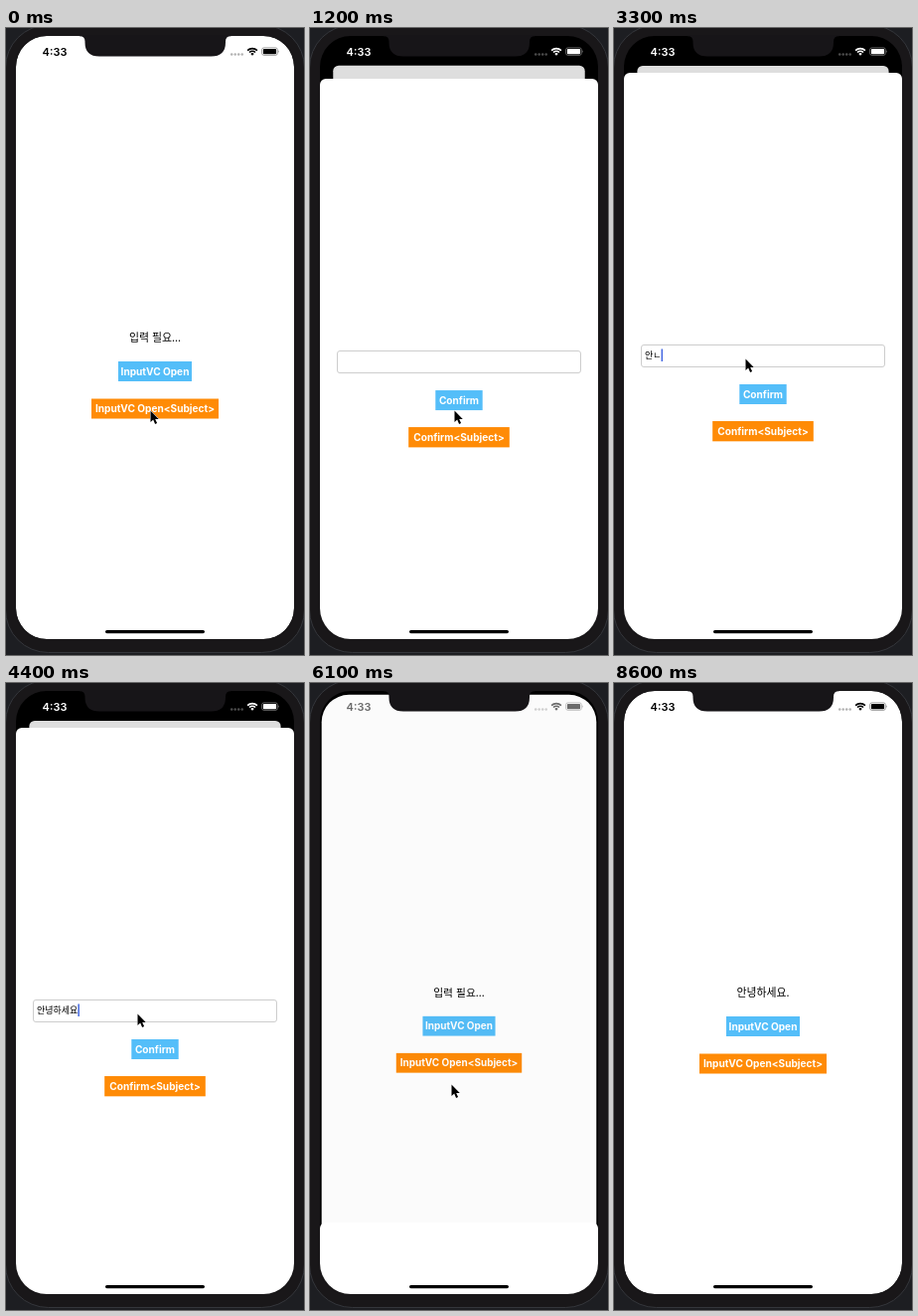
An HTML page for the animation above (8700 ms loop, 300 by 630 pixels).

```html
<!DOCTYPE html>
<html lang="ko">
<head>
<meta charset="utf-8">
<style>
  html, body { margin: 0; width: 100%; height: 100%; overflow: hidden; background: #1d1e22; }
  svg { display: block; width: 300px; height: 630px; }
  text { font-family: Inter, sans-serif; text-anchor: middle; }
  .title { font-size: 10.1px; font-weight: 700; fill: #fff; }
  .ko { font-family: "Noto Sans CJK KR", "Noto Sans CJK", sans-serif; }
  .blue { fill: #54bef9; }
  .orange { fill: #ff8b06; }
</style>
</head>
<body>
<svg viewBox="0 0 300 630">
  <defs>
    <clipPath id="screen"><rect x="10" y="8" width="280" height="606" rx="31"/></clipPath>
  </defs>
  <rect x="-.5" y="-3" width="301" height="630.5" rx="43" fill="#191719" stroke="#34363b"/>

  <g clip-path="url(#screen)">
    <rect x="10" y="8" width="280" height="606"/>
    <g id="home">
      <rect id="homeBack" x="10" y="8" width="280" height="606" fill="#fff"/>
      <text id="label" class="ko" x="150" y="315" font-size="10.9"></text>
      <rect class="blue" x="113" y="335" width="74" height="20"/>
      <text class="title" x="150" y="348.8">InputVC Open</text>
      <rect class="orange" x="86" y="372.5" width="128" height="20"/>
      <text id="openTitle" class="title" x="150" y="386.1">InputVC Open&lt;Subject&gt;</text>
      <rect id="dim" x="10" y="8" width="280" height="606"/>
    </g>

    <g id="status">
      <text x="49" y="27.5" font-size="11" font-weight="600">4:33</text>
      <g opacity=".3">
        <circle cx="227.2" cy="26.4" r="1.25"/><circle cx="230.7" cy="26.4" r="1.25"/>
        <circle cx="234.2" cy="26.4" r="1.25"/><circle cx="237.7" cy="26.4" r="1.25"/>
      </g>
      <g fill="none" stroke="currentColor" stroke-width="1.6">
        <path d="M243.1 22.6A7 7 0 0 1 252.9 22.6M245 24.5A4.3 4.3 0 0 1 251 24.5"/>
      </g>
      <path d="M248 27.7L246.3 25.9A2.4 2.4 0 0 1 249.7 25.9Z"/>
      <rect x="257.6" y="19.8" width="15.8" height="7.6" rx="2.2" fill="none" stroke="currentColor" stroke-width=".8" opacity=".45"/>
      <rect x="258.9" y="21" width="13.2" height="5.2" rx="1"/>
      <path d="M274.2 22.3Q275.6 23.6 274.2 24.9Z" opacity=".5"/>
    </g>

    <g id="sheet">
      <rect x="10" width="280" height="640" rx="6" fill="#fff"/>
      <rect x="27.5" y="273.5" width="245" height="22" rx="2.5" fill="#fff" stroke="#cdcdcd"/>
      <text id="entry" class="ko" x="31" y="287.2" font-size="9" style="text-anchor:start"></text>
      <rect id="caret" y="277.5" width="1.5" height="12.5" fill="#4468e2"/>
      <rect class="blue" x="126.3" y="313" width="47.4" height="20"/>
      <text class="title" x="150" y="326.7">Confirm</text>
      <rect class="orange" x="99.2" y="350" width="101.6" height="20.3"/>
      <text id="confirmTitle" class="title" x="150" y="363.8">Confirm&lt;Subject&gt;</text>
    </g>
    <rect x="100" y="605" width="100" height="3.2" rx="1.6"/>
  </g>

  <path d="M74 7V8.2Q79.5 8.2 79.5 13.5V14.5Q79.5 28.5 94 28.5H206.5Q221 28.5 221 14.5V13.5Q221 8.2 226.5 8.2V7Z" fill="#171518"/>
  <path id="cursor" d="M0 0V11.6L2.7 9.1L4.6 13.5L6.6 12.6L4.7 8.4H8.3Z" stroke="#fff" stroke-width="1" stroke-linejoin="round" paint-order="stroke"/>
</svg>

<script>
const LOOP = 8700, STEP = 100;
const OPEN = 829, CLOSE = 5897;
const $ = id => document.getElementById(id);
const clamp = v => Math.min(1, Math.max(0, v));
const ramp = (t, start, length) => clamp((t - start) / length);
const ease = v => v * v * (3 - 2 * v);
const mix = (a, b, p) => a + (b - a) * p;

// Critically damped spring from 0 to 1
function spring(ms) {
  const x = Math.max(0, ms) * 0.0177;
  return 1 - (1 + x) * Math.exp(-x);
}

const typing = [
  [2700, "ㅇ"], [2800, "아"], [3000, "안"],
  [3300, "안ㄴ"], [3400, "안녀"], [3500, "안녕"],
  [3700, "안녕ㅎ"], [3800, "안녕하"], [4000, "안녕하ㅅ"], [4100, "안녕하세"],
  [4200, "안녕하세ㅇ"], [4300, "안녕하세요"], [4700, "안녕하세요."]
];

function typed(t) {
  let text = "";
  for (const [at, value] of typing) if (t >= at) text = value;
  return text;
}

const pressed = (t, from, to) => t >= from && t < to ? 0.35 : 1;

function setText(node, text) {
  if (node.textContent !== text) node.textContent = text;
}

function draw(t) {
  const p = spring(t - OPEN) - spring(t - CLOSE);
  const scale = mix(1, 0.904, p);
  $("home").setAttribute("transform",
    `translate(150 ${8 + 30 * p}) scale(${scale}) translate(-150 -8)`);
  for (const id of ["homeBack", "dim"]) $(id).setAttribute("rx", mix(31, 6, p));
  $("dim").setAttribute("opacity", 0.13 * p);
  setText($("label"), t < 6500 ? "입력 필요..." : "안녕하세요.");
  $("openTitle").setAttribute("opacity", pressed(t, 500, 800));

  const light = Math.round(255 * (ramp(t, OPEN, 350) - ramp(t, CLOSE, 350)));
  const tint = `rgb(${light},${light},${light})`;
  $("status").style.color = tint;
  $("status").style.fill = tint;

  $("sheet").setAttribute("transform", `translate(0 ${mix(614, 45, p)})`);
  const text = typed(t);
  setText($("entry"), text);
  $("caret").setAttribute("x", 31 + (text ? $("entry").getComputedTextLength() : 0));
  $("caret").setAttribute("opacity", t >= 2200 ? 1 : 0);
  $("confirmTitle").setAttribute("opacity", pressed(t, 5600, 5800));

  const up = ease(ramp(t, 1400, 600)), down = ease(ramp(t, 4800, 700));
  $("cursor").setAttribute("transform",
    `translate(${145.5 - 13 * up + 10 * down} ${384.5 - 52 * up + 71 * down})`);
  $("cursor").setAttribute("opacity", t < 7800 ? 1 : 0);
}

function tick() {
  const t = performance.now() % LOOP;
  draw(Math.floor(t / STEP) * STEP);
  requestAnimationFrame(tick);
}
tick();
</script>
</body>
</html>
```
